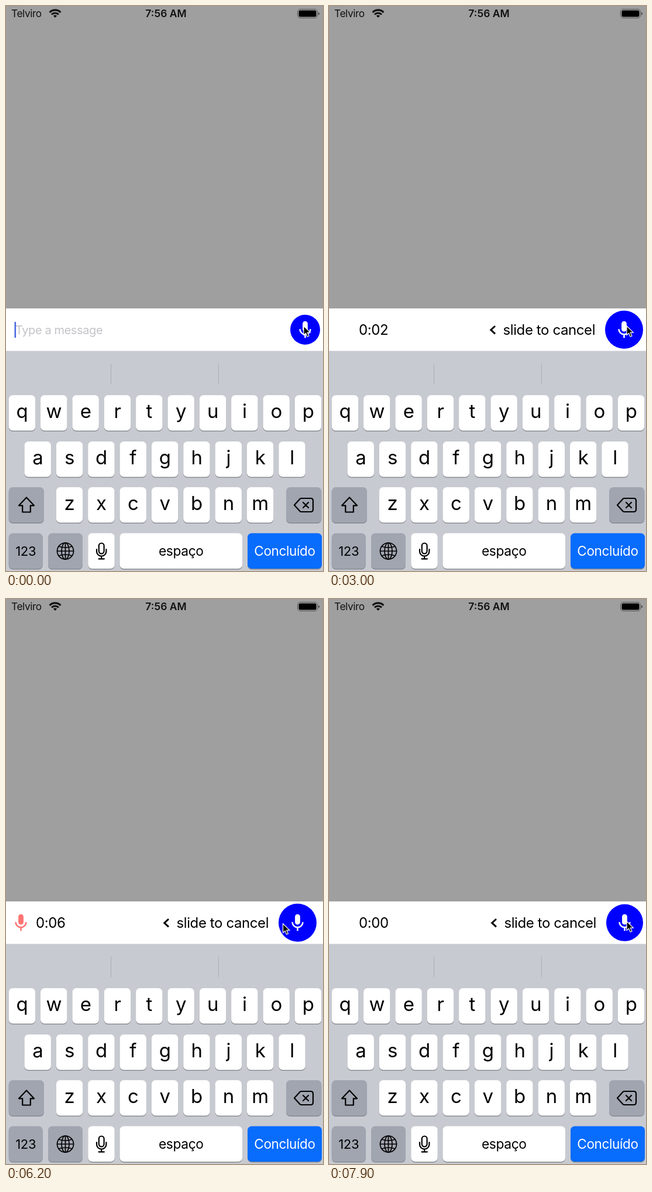
Write an HTML page that moves like this. It is 542 px wide and 964 px high and loops after 8000 ms.

```html
<!DOCTYPE html>
<html lang="pt">
<head>
<meta charset="utf-8">
<title>Voice message</title>
<style>
html, body { margin: 0; width: 100%; height: 100%; overflow: hidden; background: #9f9f9f; }
svg { display: block; width: 100vw; height: 100vh; }
text { font-family: Inter, Roboto, sans-serif; letter-spacing: -.4px; white-space: pre; }
.line { fill: none; stroke: #000; stroke-width: 2.2; stroke-linejoin: round; stroke-linecap: round; }
</style>
</head>
<body>
<svg viewBox="0 0 542 964">
  <defs>
    <g id="mic">
      <rect x="-4.4" y="-14.2" width="8.8" height="17.8" rx="4.4" stroke="none"/>
      <path d="M-9 -.8a9 9 0 0 0 18 0M0 8.2V14.2" fill="none" stroke-width="2.6"/>
    </g>
  </defs>
  <rect width="542" height="964" fill="#9f9f9f"/>

  <g fill="#111">
    <text x="9" y="19" font-size="17.3">Telviro</text>
    <text x="273.5" y="19" font-size="17.5" font-weight="600" text-anchor="middle" style="letter-spacing:0">7:56 AM</text>
    <g fill="none" stroke="#111" stroke-width="3.2">
      <path d="M74.6 10.9a13.2 13.2 0 0 1 18.8 0M78 14.5a8.4 8.4 0 0 1 12 0"/>
    </g>
    <path d="M84 20l-3.1-3.2a4.4 4.4 0 0 1 6.2 0z"/>
    <rect x="498.5" y="5.5" width="34" height="15" rx="4.5" fill="none" stroke="#555"/>
    <rect x="500.5" y="7.5" width="30" height="11" rx="2.5" fill="#000"/>
    <path d="M534 10.5q2 .5 2 2.5t-2 2.5z" fill="#444"/>
  </g>

  <rect y="516" width="542" height="73" fill="#fff"/>
  <g id="idle">
    <text x="16" y="560" font-size="20" fill="#c4c4c8">Type a message</text>
    <rect x="14.5" y="539" width="2.6" height="27" fill="#4968e0"/>
  </g>
  <g id="recording">
    <use id="blink" href="#mic" x="25.5" y="552" fill="#f33" stroke="#f33"/>
    <text id="timer" x="51" y="561" font-size="24"></text>
    <g id="hint">
      <path d="M-188 546l-7.2 6.7 7.2 6.7" fill="none" stroke="#000" stroke-width="3"/>
      <text x="-174.5" y="561" font-size="24">slide to cancel</text>
    </g>
  </g>

  <rect y="588.5" width="542" height="376" fill="#c8cad1"/>
  <path d="M179.5 610v35M363.5 610v35" stroke="#b0b3ba" stroke-width="1.2"/>
  <g id="keys"></g>
  <g class="line">
    <path d="M35 838.5L48 852.3h-6.2v11.2h-13.6v-11.2H22z"/>
    <path d="M493 851.5l9.5-10.5q1-1 2.500-1H521q4 0 4 4v15q0 4-4 4h-16q-1.500 0-2.500-1zM508 847l9 9m0-9l-9 9"/>
    <g stroke-width="1.7">
      <circle cx="101.500" cy="930" r="14"/>
      <ellipse cx="101.500" cy="930" rx="6.500" ry="14"/>
      <path d="M87.500 930h28M101.500 916v28M90 922q11.500 4 23 0M90 938q11.500-4 23 0"/>
    </g>
    <rect x="158.800" y="916.500" width="8.800" height="18" rx="4.400"/>
    <path d="M155 927v3.500a8.200 8.200 0 0 0 16.400 0V927M163.200 938.500v4.800M158.500 943.300h9.400"/>
  </g>

  <circle id="button" cy="552.3" fill="#00f"/>
  <use id="buttonMic" href="#mic" y="552" fill="#fff" stroke="#fff"/>
  <path id="pointer" d="M0 0v15.500l3.600-3.300 2.600 6 2.700-1.200-2.600-5.900h5z" stroke="#fff" stroke-width="1.200"/>
</svg>
<script>
const $ = id => document.getElementById(id);

function key(x, y, width, label = "", size = 33, fill = "#fff", ink = "#000") {
  const box = (dy, color) =>
    `<rect x="${x}" y="${y + dy}" width="${width}" height="60.5" rx="7" fill="${color}"/>`;
  const base = size > 30 ? 39 : 38;
  $("keys").innerHTML += box(1.6, "#888b92") + box(0, fill) +
    `<text x="${x + width / 2}" y="${y + base}" font-size="${size}" fill="${ink}" text-anchor="middle">${label}</text>`;
}

const GREY = "#a0a5b0";
[["qwertyuiop", 4.7, 664], ["asdfghjkl", 31.5, 743], ["zxcvbnm", 85.8, 821]].forEach(([letters, x, y]) =>
  [...letters].forEach((letter, i) => key(x + i * 54.35, y, 45.4, letter)));
key(4.7, 821, 60.3, "", 22, GREY);
key(479, 821, 60.3, "", 22, GREY);
key(4.7, 899.5, 58, "123", 22, GREY);
key(72, 899.5, 59, "", 22, GREY);
key(140.3, 899.5, 45.4);
key(194.5, 899.5, 209.5, "espaço", 22.8);
key(413, 899.5, 127, "Concluído", 22.6, "#086cfd", "#fff");

const clamp = v => Math.min(1, Math.max(0, v));
const ease = v => (v = clamp(v)) * v * (3 - 2 * v);

// Linear interpolation through [time, value] points
function track(t, points) {
  let [t0, v0] = points[0];
  for (const [t1, v1] of points) {
    if (t < t1) return v0 + (v1 - v0) * clamp((t - t0) / (t1 - t0));
    [t0, v0] = [t1, v1];
  }
  return v0;
}

const LOOP = 8000, STEP = 100, CANCEL = 6700, PRESS = 7700;
const dragPath = [[6000, 0], [6200, -6], [6400, -50], [6600, -118], [CANCEL, -150]];
const pointerX = [[5500, 509], [5900, 503], [6200, 473.5], [6400, 420], [6600, 335],
  [6700, 300.5], [6900, 310], [7300, 450], [7600, 509]];
const pointerY = [[5500, 546], [5900, 547], [6200, 554], [6700, 562], [6900, 562], [7600, 550]];

function draw(t) {
  const again = t >= PRESS;
  const recording = again || (t >= 100 && t < CANCEL);
  const start = again ? PRESS : 100;
  const seconds = Math.max(0, Math.floor((t - start) / 1000));
  const back = again ? 1 : ease((t - CANCEL) / 300);
  const grown = again || t < CANCEL ? ease((t - start + 30) / 300) : 1 - back;
  const r = 25.5 + 7 * (t < 100 ? 0 : grown);
  const x = 537 - r + track(t, dragPath) * (1 - back);

  $("idle").style.display = recording ? "none" : "";
  $("recording").style.display = recording ? "" : "none";
  $("timer").textContent = `0:0${seconds}`;
  $("hint").setAttribute("transform", `translate(${x - r} 0)`);
  const fade = (t % 1000 - 50) / 400;
  $("blink").style.opacity = seconds && fade >= 0 ? 1 - ease(fade) : 0;

  $("button").setAttribute("cx", x);
  $("button").setAttribute("r", r);
  $("buttonMic").setAttribute("x", x);
  $("pointer").setAttribute("transform", `translate(${track(t, pointerX)} ${track(t, pointerY)})`);
}

const origin = performance.now();
function tick() {
  const t = (performance.now() - origin) % LOOP;
  draw(Math.floor(t / STEP) * STEP);
  requestAnimationFrame(tick);
}
tick();
</script>
</body>
</html>
```
